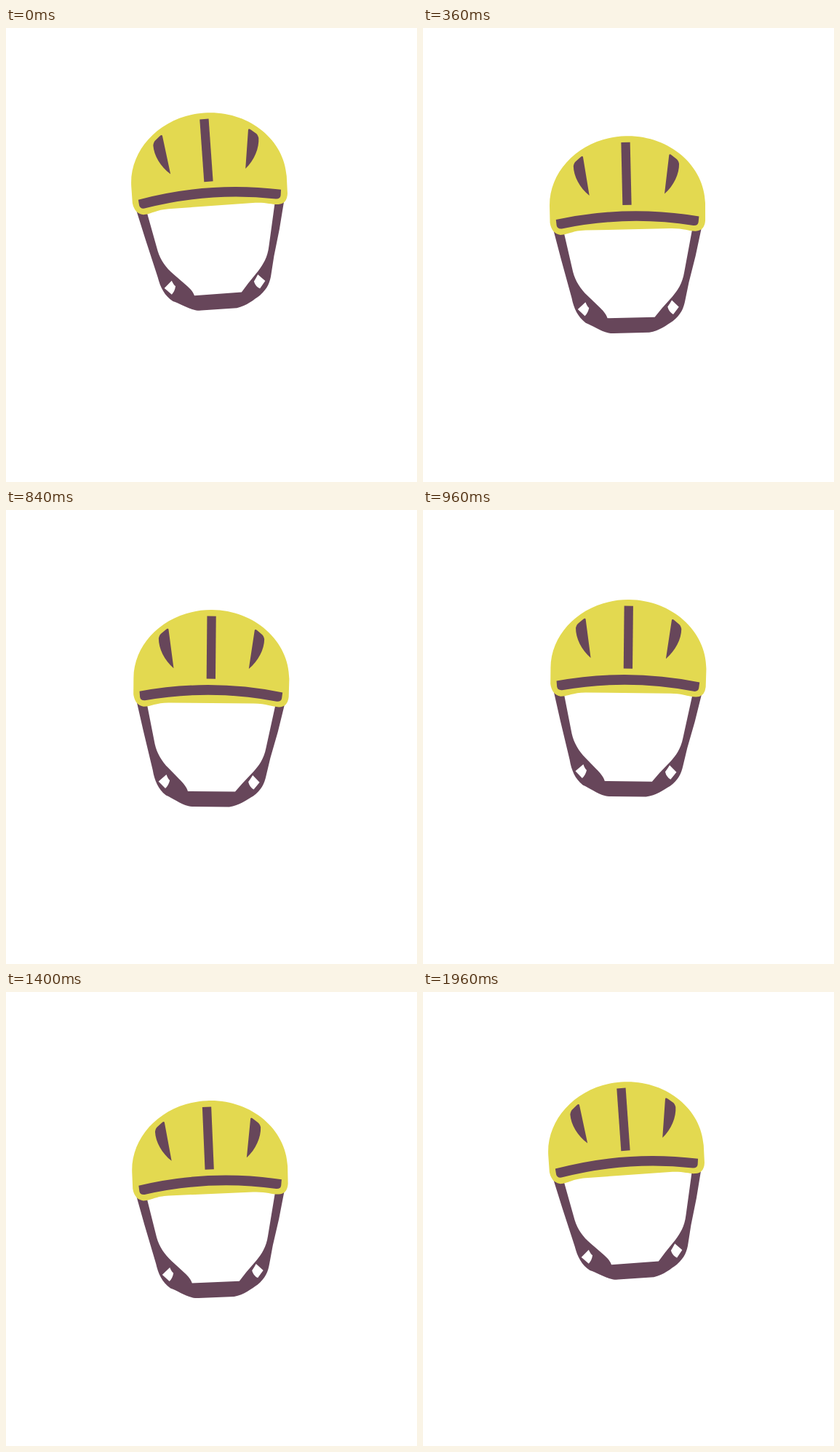
These frames come from a looping animation (565x623 px, 2 s). An HTML page:

```html
<!DOCTYPE html>
<html lang="en">
<head>
<meta charset="utf-8">
<title>Bobbing helmet</title>
<style>
  html, body { margin: 0; width: 100%; height: 100%; overflow: hidden; background: #fff; }
  svg { display: block; width: 100vw; height: 100vh; }
  .dark { fill: #67465a; }
  .shell { fill: #e3d950; }
  .hole { fill: #fff; }
</style>
</head>
<body>
<svg viewBox="0 0 565 623">
  <g id="helmet">
    <path class="dark" d="M179.500 260 L189 300 L202.500 354 C205 368 210 380 221 388.500 C230 392 240 400 252 403 Q255 403.700 259 403.700 H308
      C322 401.500 332 394 341 388.500 C352 380 356 372 358.500 360 L364 336 L374 300 L383.500 260 H371
      L358 322 C355 338 348 347 341 355 L326 371 L316 382.700 H251 C249 376 244 371 240 367
      L224 351 C215 342 208 331 205 318 L193 260 Z"/>
    <path class="hole" d="M210.500 369.500 L221.300 360 Q223.500 366 226 368 Q224.500 375 220 379 Z"/>
    <path class="hole" d="M334 369 Q337 365 340 360 L349.500 369.500 L341.500 379.500 Q335.500 376 334 369 Z"/>
    <path class="shell" d="M175 228 C175 176 223 133.500 282 133.500 S389 176 389 228 L388.500 252
      Q387 266 375 266 C366 266 358 261.500 340 261.500 H224 C206 261.500 200 267 189 267 Q177 265 175 250 Z"/>
    <path class="dark" d="M183.300 246 Q282 227 380 246 L379 254 Q378 259 372 258.300 Q282 242 191 258.500 Q185 259 184 254 Z"/>
    <rect class="dark" x="275.300" y="142" width="12.300" height="86"/>
    <path id="vent" class="dark" d="M222.500 161 L230 214 C217 203 209 187 209 173 Q210 168 213 166 L219 161 Q222 158.500 222.500 161 Z"/>
    <use href="#vent" transform="translate(563.300 0) scale(-1 1)"/>
  </g>
</svg>
<script>
const LOOP = 2000, BOB = 1000, STEP = 40, LAG = 20;
const TOP = -17.4, DEPTH = 35;
const TILT = { from: -4.05, to: 0.6 };
const helmet = document.getElementById('helmet');

// Falls fast and settles, then climbs at an even pace to the next bob.
function bob(t) {
  const s = t % BOB;
  return Math.min(1 - Math.exp(-s / 135), (BOB - s) / 300);
}

// cubic-bezier(.25, .1, .25, 1), solved by bisection
function ease(x) {
  const curve = (s, a, b) => 3 * (1 - s) * s * ((1 - s) * a + s * b) + s * s * s;
  let lo = 0, hi = 1;
  for (let i = 0; i < 24; i++) {
    const mid = (lo + hi) / 2;
    if (curve(mid, 0.25, 0.25) < x) lo = mid; else hi = mid;
  }
  return curve(lo, 0.1, 1);
}

function tilt(t) {
  const half = LOOP / 2;
  const swing = t < half ? ease(t / half) : 1 - ease(t / half - 1);
  return TILT.from + (TILT.to - TILT.from) * swing;
}

function draw(now) {
  const held = Math.floor((now % LOOP) / STEP) * STEP;
  const t = Math.max(0, held - LAG);
  helmet.setAttribute('transform',
    `translate(0 ${TOP + DEPTH * bob(t)}) rotate(${tilt(t)} 282 270)`);
}

const start = performance.now();
function tick() {
  draw(performance.now() - start);
  requestAnimationFrame(tick);
}
tick();
</script>
</body>
</html>
```
